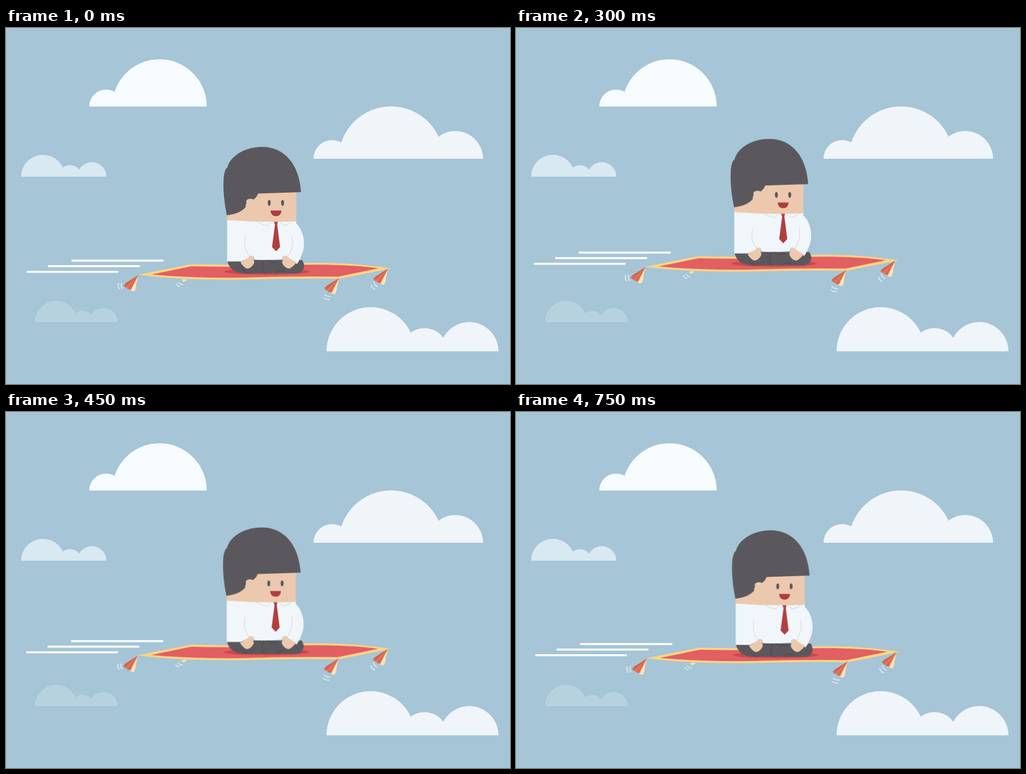
Animation of 890x629 px, one loop 900 ms. Source, as an HTML page:

```html
<!DOCTYPE html>
<html lang="en">
<head>
<meta charset="utf-8">
<title>Magic carpet ride</title>
<style>
  html, body { margin: 0; width: 100%; height: 100%; overflow: hidden; background: #a6c5d6; }
  svg { display: block; width: 100vw; height: 100vh; }

  /* The ride bobs in held poses, without easing between them. */
  .ride { animation: bob 900ms step-end infinite; }
  @keyframes bob {
    0%, 100% { transform: translate(0, 0); }
    16.6667% { transform: translate(-.8px, -6.2px); }
    33.3333% { transform: translate(-5px, -14.2px); }
    50%      { transform: translate(-.8px, -6.2px); }
    66.6667% { transform: translate(-.8px, 1.2px); }
    83.3333% { transform: translate(-2.6px, -1px); }
  }

  .line { fill: none; stroke-linecap: round; }
  .speed { stroke: #fff; stroke-width: 3.4; }
  .flick { stroke: #d3e3ee; stroke-width: 2.2; stroke-linecap: butt; }
  .fold { stroke: #d0d9de; stroke-width: 1; }
  .crease { stroke: #48464a; stroke-width: 1; }
  .shirt { fill: #f0f6f9; }
  .skin { fill: #ecc9ae; }
  .dark { fill: #5b585d; }
  .trim { fill: #fcd581; }
  .pile { fill: #e25f62; }
</style>
</head>
<body>
<svg viewBox="0 0 890 629" preserveAspectRatio="none">
  <defs>
    <g id="tassel">
      <path fill="#fde3b4" d="M0 0Q-2 8-4 16Q-4 24-7.500 29L-14 27.500Q-10 22-9 14Z"/>
      <path fill="#e2674a" d="M0 0L-26.500 18.500Q-24 22-21 22.500ZM0 0L-20.500 23Q-19 25.500-13.500 25.500Z"/>
      <path fill="#cb5b43" d="M0 0L-22 14L-26.500 18.500L-19 15Z"/>
    </g>
  </defs>

  <g id="clouds"></g>

  <g class="ride">
    <path class="line speed" d="M117 411H277M75.500 420.700H235M38 430.700H197"/>

    <path fill="#fde3b4" d="M311 444H320Q317 448 312 448.500Z"/>
    <path class="trim" d="M233 436L327 417.300Q385 419 430 418C490 415.500 560 413.500 610 417Q650 420 681 424.800L588 443.300Q530 441.500 420 444.500Q310 446 233 436Z"/>
    <path class="pile" d="M257 435.500L327 421Q390 422.500 440 421C500 418.500 560 417 610 420Q638 421.500 658 424.600L587 439.300Q520 438 420 441Q330 442.500 257 435.500Z"/>
    <ellipse cx="461" cy="430.500" rx="75.500" ry="5.500" fill="#c9484d"/>

    <use href="#tassel" x="234" y="436.500"/>
    <use href="#tassel" x="588.500" y="441.500"/>
    <use href="#tassel" x="675" y="425"/>
    <path class="line flick" d="M205 450Q201 456 206.500 460.500M199 450.500Q196 457 201.500 461.500
      M305 449Q307 453.500 313 453.500M300.500 451.500Q302 456.500 307.500 456.500
      M562 470.500Q566 475 574 474.500M560.500 476.500Q565 480.500 572 480
      M650 448Q650 455 657 457M645 453.500Q646 460.500 652.500 462"/>

    <!-- Crossed legs -->
    <path class="dark" d="M390.500 410H523Q527 417 526.500 422Q524 433.500 511 433.500H425C406 433.500 394 427 390.500 410Z"/>
    <path class="line crease" d="M416 424Q419 432 428 433M453 428Q453 432 458 433.500M456 411Q451 419 454 430M460 409.500Q466 410 468 415Q474 412 481 414M476 433Q482 426 491 431"/>

    <!-- Shirt -->
    <path class="shirt" d="M390.500 337H512.500V345.500C524 355 530 379 524 396Q520 408 514 417L497 404L488 408Q462 411 440 409L434 403L416 412.500H390.500Z"/>
    <path class="line fold" d="M422.500 370C420 383 422 395 431 404M505 367C508 383 504 395 497 404M443 342Q450 347 462 349.500L467 344M485 344L489 349Q499 348 505 342"/>
    <path class="skin" d="M414 414L427 407Q430 401.500 434 402Q438 403 438.500 406L435.500 408.500Q441 413 436 419Q431 425.500 425 425Q419 422 414 414ZM513 414L499 406Q496 402 492.500 402Q488 403 488 406L490.500 408.500Q485 413 490 419Q495 425.500 501 425Q508 421 513 414Z"/>
    <path fill="#b0403f" d="M473 342H480L479 347.500L484 387L477 394.500L469.800 387L475 347.500Z"/>

    <!-- Head -->
    <path class="skin" d="M390.500 285H512.500V341.800Q450 344 390.500 339.500Z"/>
    <path class="dark" d="M390 331C385 306 383 285 384.500 263Q386 250 391 246C397 224 425 210 452 210C492 210 518 241 521 290L445 292.500Q443 299 437 303Q430 300.500 425.500 303.500Q423 307 425 310Q422 312 423.500 316Q414 328 390 331Z"/>
    <g class="dark">
      <ellipse cx="464.800" cy="309" rx="2.600" ry="5.300"/>
      <ellipse cx="488.400" cy="309" rx="2.600" ry="5.300"/>
    </g>
    <path fill="#b03c3f" d="M467 322.500H486.500Q485.500 332.500 476.800 332.500T467 322.500Z"/>
  </g>
</svg>
<script>
  // Each cloud: fill, baseline, then [centre x, radius] per half-round puff.
  const clouds = [
    ['#f6fbfe', 138.700, [177, 30], [271, 83.500]],
    ['#eff5f9', 231, [576, 33], [680, 92.500], [793.500, 49]],
    ['#d9e9f1', 262.700, [65.300, 38.700], [113, 20.500], [151.500, 25.700]],
    ['#b5d2de', 519.700, [88.500, 37.500], [135, 20], [172.200, 25]],
    ['#eff5f9', 571.200, [644, 78], [739, 41], [818, 51.700]]
  ];
  const puff = base => ([x, r]) => `M${x - r} ${base}a${r} ${r} 0 0 1 ${2 * r} 0z`;
  document.getElementById('clouds').innerHTML = clouds.map(([fill, base, ...puffs]) =>
    `<path fill="${fill}" d="${puffs.map(puff(base)).join('')}"/>`).join('');
</script>
</body>
</html>
```
